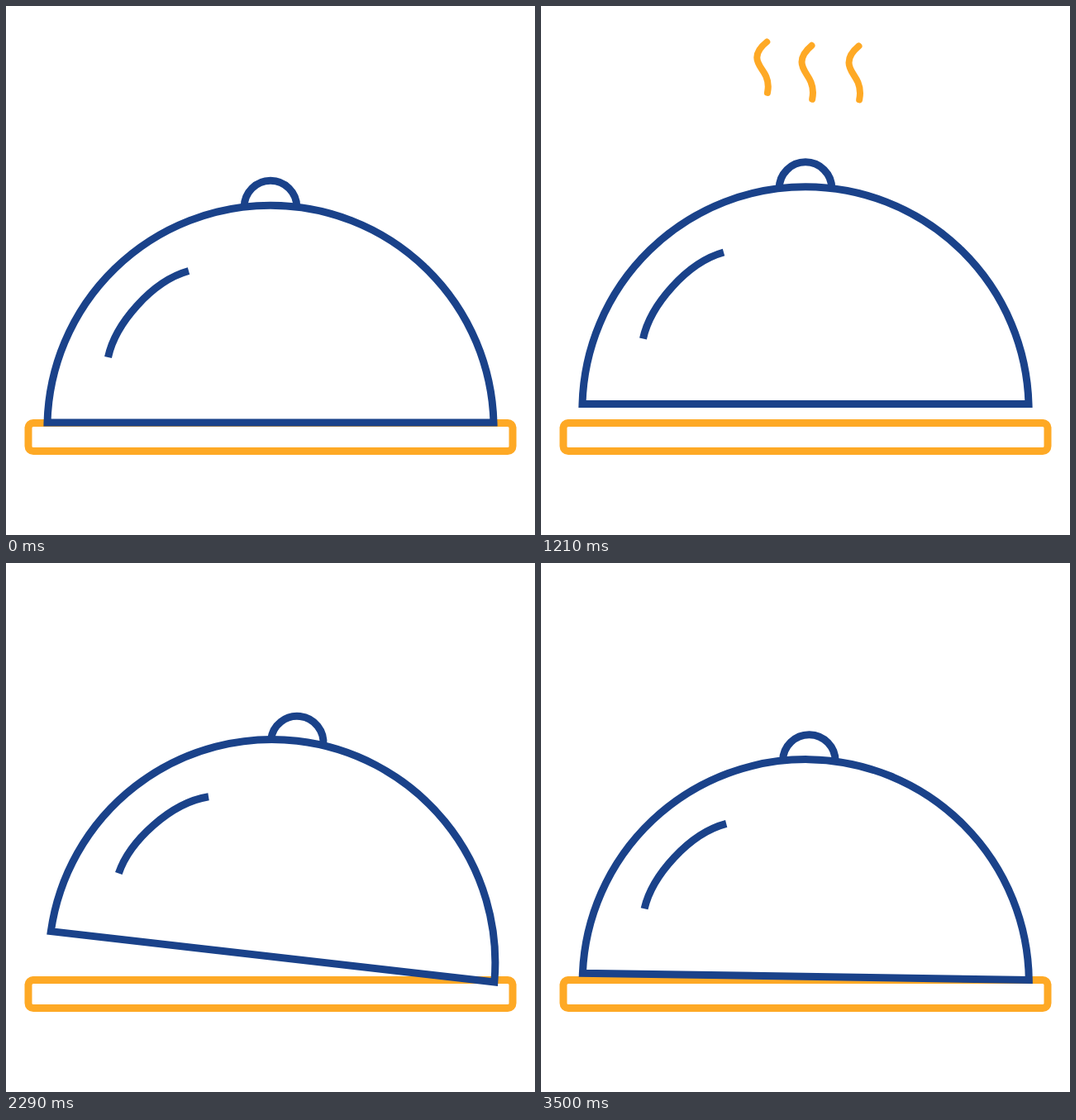
Recreate the animation shown at these times as an HTML page. Size 640x640 px, loop 3.57 s.

```html
<!DOCTYPE html>
<html lang="en">
<head>
<meta charset="utf-8">
<title>Serving dome</title>
<style>
  html, body { margin: 0; height: 100%; overflow: hidden; background: #fff; }
  svg { display: block; width: 100%; height: 100%; fill: none; }
  .plate, .steam { stroke: #fea925; }
  .lid { stroke: #1a428a; }
  .plate, .lid { stroke-width: 9; }
  .steam { stroke-width: 8; stroke-linecap: round; }
</style>
</head>
<body>
<svg viewBox="0 0 640 640">
  <rect class="plate" x="27" y="504.5" width="586" height="34" rx="6"/>
  <g class="lid" id="lid">
    <path d="M50 504A270.1 270.1 0 0 1 590 504Z"/>
    <path d="M288.2 244V243.3A31.8 32 0 0 1 351.8 243.3V244"/>
    <path d="M123.5 425C132 385 176 333 221 320.5"/>
  </g>
  <g class="steam" id="steam"></g>
</svg>
<script>
const LOOP = 3570, STEP = LOOP / 50;
const WISP = 'M.5 93C7 93 13.5 66 13.5 57C13.5 38 0 33 0 20C0 12 6 5 12 0';
const lid = document.getElementById('lid');
const steam = document.getElementById('steam');

// x, vertical scale, and height keys as time, value pairs
const wisps = [
  { x: 261.3, scale: 0.95, keys: [[0, 55.7], [1130, 40.4], [1795, 64]] },
  { x: 315.5, scale: 1, keys: [[0, 80], [960, 60.5], [1795, 18.8]] },
  { x: 372.5, scale: 1, keys: [[0, 90], [960, 28.2], [1795, 94.8]] }
];

for (const w of wisps) {
  w.path = document.createElementNS('http://www.w3.org/2000/svg', 'path');
  w.path.setAttribute('d', WISP);
  w.path.setAttribute('pathLength', 1);
  steam.append(w.path);
}

// Linear interpolation through keys, held at both ends
function track(keys, t) {
  if (t <= keys[0][0]) return keys[0][1];
  for (let i = 1; i < keys.length; i++) {
    const [t0, a] = keys[i - 1], [t1, b] = keys[i];
    if (t < t1) return a + (b - a) * (t - t0) / (t1 - t0);
  }
  return keys[keys.length - 1][1];
}

function draw(t) {
  const lift = track([[0, 0], [995, 28.8], [1992, 0]], t);
  const tilt = track([[1990, 0], [2759, 1], [3539, 0]], t);
  lid.setAttribute('transform',
    `translate(${47.9 * tilt} ${-69.9 * tilt - lift}) rotate(${17 * tilt} 320 365)`);

  const head = track([[0, 0], [965, 1]], t);
  const tail = track([[960, 0], [1795, 1]], t);
  const length = head - tail;
  steam.setAttribute('visibility', length > 0.02 ? 'visible' : 'hidden');
  for (const { path, x, scale, keys } of wisps) {
    path.setAttribute('transform', `translate(${x} ${track(keys, t)}) scale(1 ${scale})`);
    path.setAttribute('stroke-dasharray', `${length} 2`);
    path.setAttribute('stroke-dashoffset', -tail);
  }
}

// The motion is held in 50 even steps per loop
function tick() {
  const t = performance.now() % LOOP;
  draw(Math.floor((t + 5) / STEP) * STEP % LOOP);
  requestAnimationFrame(tick);
}
tick();
</script>
</body>
</html>
```
